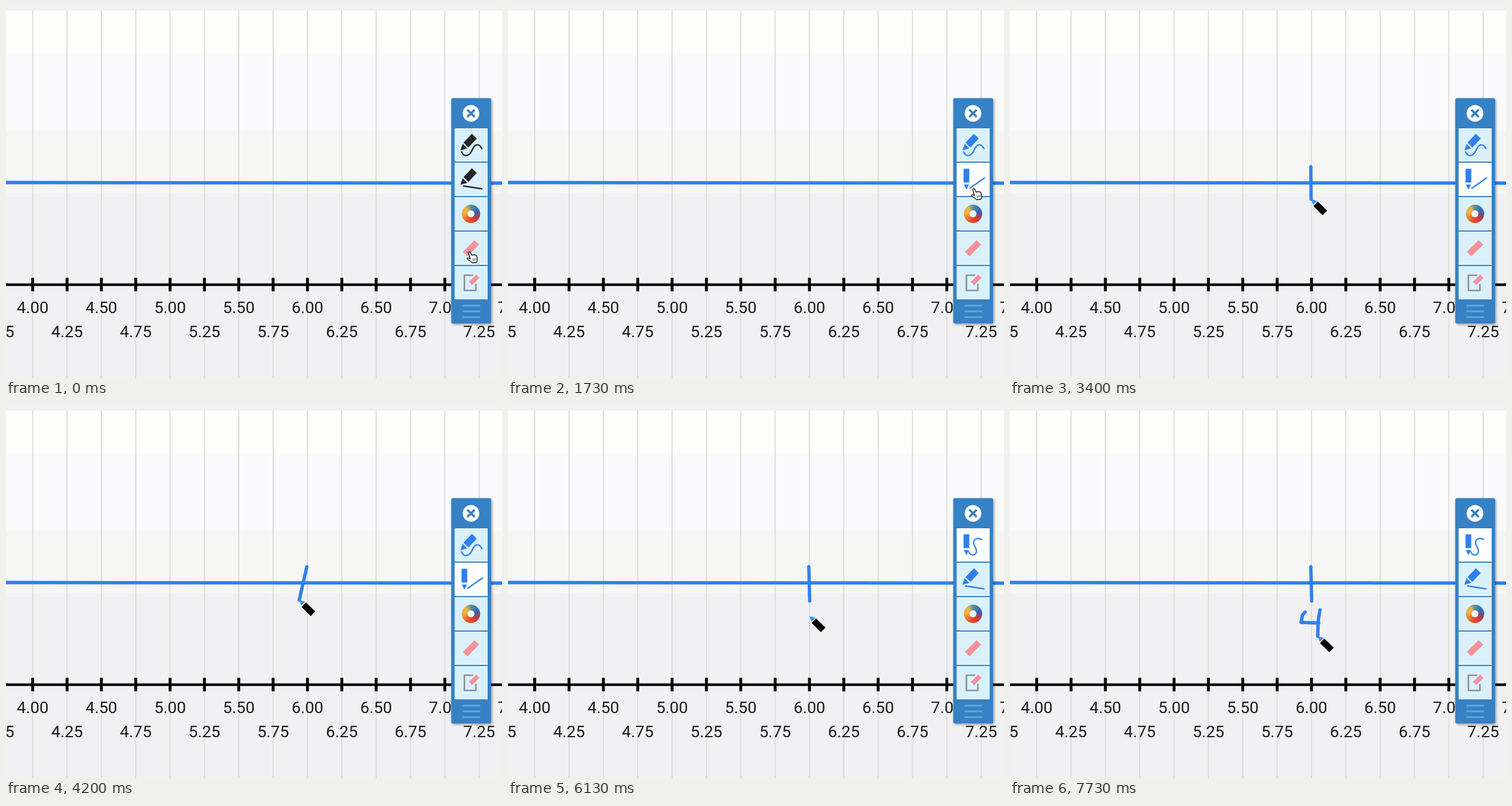
Recreate the animation shown at these times as an HTML page. Size 864 by 648 pixels, loop 9460 ms.

```html
<!DOCTYPE html>
<html lang="en">
<head>
<meta charset="utf-8">
<title>Number line drawing</title>
<style>
  html, body { margin: 0; width: 100%; height: 100%; overflow: hidden; background: #f1f1f3; }
  svg { display: block; width: 864px; height: 648px; }
  text { font: 28.4px Roboto, sans-serif; text-anchor: middle; fill: #1c1c1c; }
  .bar { fill: #3681c3; filter: drop-shadow(2px 2px 2px rgba(0, 0, 0, .35)); }
  .cell { fill: #daf1fc; }
  .ink, .icon path { fill: none; stroke-linecap: round; stroke-linejoin: round; }
  .ink { stroke: #2f80ed; stroke-width: 5.8; }
  .icon { fill: currentColor; stroke: none; }
  .icon path { stroke: currentColor; stroke-width: 2.4; }
  .wheel {
    width: 32px; height: 32px; border-radius: 50%;
    background:
      radial-gradient(circle, #eef6fa 5.5px, transparent 6.5px),
      conic-gradient(#5c8c98, #3c78b8 40deg, #3f5f9c 80deg, #a0405c 110deg, #dc3c2c 150deg,
        #e4502c 200deg, #f08a34 245deg, #f4b23e 285deg, #d8b450 325deg, #5c8c98);
  }
  .pink { fill: #f4929a; }
  [data-tool="line"] .line, [data-tool="free"] .free { fill: #fff; }
  .on { display: none; }
  [data-tool="line"] .line .on, [data-tool="free"] .free .on { display: inline; }
  [data-tool="line"] .line .off, [data-tool="free"] .free .off { display: none; }
  [data-tool="line"] .line.cell, [data-tool="free"] .free.cell { fill: #fff; }
</style>
</head>
<body>
<svg id="stage" viewBox="0 0 864 648">
  <defs>
    <g id="tilted">
      <polygon points="811.5,222.5 820,231 805.5,246.5 797,238"/>
      <polygon points="795.5,240 803.5,248 791.5,251.5"/>
    </g>
    <g id="upright">
      <rect x="793.5" y="223.5" width="10" height="24"/>
      <polygon points="794,251 803,251 798.5,260"/>
    </g>
  </defs>

  <rect width="864" height="648" fill="#f1f1f3"/>
  <rect y="8" width="864" height="75" fill="#fefefd"/>
  <rect y="83" width="864" height="135" fill="#fafafd"/>
  <rect y="218" width="864" height="108" fill="#f6f6f5"/>
  <path id="grid" stroke="#dcdcda" stroke-width="2"/>
  <path d="M0 485.5H864" stroke="#000" stroke-width="4.5"/>
  <path id="ticks" stroke="#000" stroke-width="5"/>
  <g id="labels"></g>

  <path class="ink" d="M-5 307.5L870 308.5"/>
  <path class="ink" id="rule"/>
  <path class="ink" id="script"/>

  <rect class="bar" x="775.5" y="160.500" width="69.500" height="392.500" rx="3"/>
  <circle cx="810" cy="187" r="14.500" fill="#fff"/>
  <path d="M804.800 181.800l10.400 10.400m0-10.400l-10.400 10.400" stroke="#3681c3" stroke-width="4" stroke-linecap="round"/>
  <g id="cells"></g>

  <g class="icon free">
    <g class="off">
      <use href="#tilted"/>
      <path d="M793.500 254C798 264 807 262 812 251C817 239 824 239 829 248.500"/>
    </g>
    <g class="on" fill="currentColor">
      <use href="#upright"/>
      <path d="M825 232.500C819 229 811 231 811 238C811 244 816 246 816 253C816 261 805 262 803 254"/>
    </g>
  </g>
  <g class="icon line" transform="translate(0 60)">
    <g class="off">
      <use href="#tilted"/>
      <path d="M797 253.500L829 258.500"/>
    </g>
    <g class="on" fill="currentColor">
      <use href="#upright"/>
      <path d="M804.500 257.500L830 239.500"/>
    </g>
  </g>
  <foreignObject x="794" y="346" width="32" height="32"><div class="wheel"></div></foreignObject>
  <rect class="pink" x="-14.500" y="-5.500" width="29" height="11" transform="translate(810 422) rotate(-45)"/>
  <path d="M814 469H798.500V495.500H818.500V484" fill="none" stroke="#8e8e8e" stroke-width="2.600"/>
  <rect class="pink" x="-9" y="-4" width="18" height="8" transform="translate(815.500 477) rotate(-45)"/>
  <path d="M795 522H826M795 532H826M795 542H826" stroke="#62a5dd" stroke-width="3"/>

  <g id="palette">
    <path class="cell" d="M782 332H434.500V391.500H782"/>
    <rect x="724" y="333" width="58" height="58" fill="#fff"/>
    <path d="M782 332H434.500V391.500H782" fill="none" stroke="#3681c3" stroke-width="2.200"/>
  </g>

  <g id="pencil">
    <polygon points="0,0 10.500,3 3.500,9.500" fill="#3b8cf0"/>
    <polygon points="11.500,4 28,20 20,28 4,12" fill="#000" stroke="#fff" stroke-opacity=".6" stroke-width="1" paint-order="stroke"/>
  </g>
  <g id="hand" fill="#fff" stroke="#111" stroke-width="1.400" stroke-linejoin="round">
    <path d="M-1.500 2Q-.5-1 2 1L4.500 6.500Q6 4.500 7.500 6Q9 4.500 10.500 6Q12.500 5.500 13 8L14 13Q14.500 16 12.500 18.500L5.500 19.500Q2 16-3.500 13Q-4 10.500-1 11L1.500 12Z"/>
    <path d="M6 12.500l1 3.500m1.500-4l1 3.500m1.500-4l1 3" stroke-width="1"/>
  </g>
</svg>
<script>
const LOOP = 9460, FPS = 15;
const BLUE = '#2f80ed', BLACK = '#252525';
const $ = id => document.getElementById(id);
const stage = $('stage');

function add(parent, tag, attrs, text = '') {
  const el = document.createElementNS('http://www.w3.org/2000/svg', tag);
  for (const k in attrs) el.setAttribute(k, attrs[k]);
  el.textContent = text;
  parent.append(el);
}

// Number line: one mark per quarter, labels on two alternating rows
let grid = '', ticks = '';
for (let i = -1; i < 15; i++) {
  const x = 46.5 + i * 59.83;
  grid += `M${x} 8V648`;
  ticks += `M${x} 473.5V497`;
  add($('labels'), 'text', { x, y: i % 2 ? 577 : 535 }, (4 + i / 4).toFixed(2));
}
$('grid').setAttribute('d', grid);
$('ticks').setAttribute('d', ticks);

['free', 'line', '', '', ''].forEach((tool, i) =>
  add($('cells'), 'rect', { class: 'cell ' + tool, x: 781.5, y: 213 + i * 60, width: 57.5, height: 58 }));

['#d8473f', '#f3a33a', '#fbe84a', '#4fae33', BLUE, BLACK].forEach((fill, i) =>
  add($('palette'), 'circle', { cx: 464.5 + i * 57.6, cy: 362, r: 15.7, fill }));

// Cursor path: step, x, y
const track = [
  [1, 807, 428], [4, 815, 368], [10, 815, 368], [17, 693, 363], [19, 694, 364],
  [25, 811, 318], [37, 811, 318], [43, 524, 281], [45, 524, 280], [51, 524.5, 336.5],
  [54, 524.5, 336.5], [57, 543, 337], [64, 509, 338], [65, 509, 338], [71, 525.5, 339.5],
  [75, 525.5, 339.5], [76, 563, 341], [81, 808, 246], [83, 808, 246], [90, 526, 366],
  [92, 525, 366], [95, 514, 359], [97, 509.5, 364], [99, 507, 377], [103, 538, 378],
  [105, 541, 358], [107, 540, 355], [110, 537, 373], [116, 536, 401]
];

function cursorAt(n) {
  const i = track.findIndex(k => k[0] > n);
  if (i === 0) return track[0].slice(1);
  if (i < 0) return track[track.length - 1].slice(1);
  const [a, ax, ay] = track[i - 1], [b, bx, by] = track[i];
  const u = (n - a) / (b - a), e = u * u * (3 - 2 * u);
  return [ax + (bx - ax) * e, ay + (by - ay) * e];
}

function stroke(from, to, n) {
  if (n < from) return '';
  const pts = [];
  for (let k = from; k <= Math.min(n, to); k++) pts.push(cursorAt(k).join(' '));
  return `M${pts[0]}L${pts.join('L')}`;
}

function draw(t) {
  const n = Math.floor((t + 7) * FPS / 1000);
  const [x, y] = cursorAt(n);
  const isHand = n < 26 || x > 775;
  stage.dataset.tool = n < 26 ? '' : n < 83 ? 'line' : 'free';
  stage.style.color = n < 20 ? BLACK : BLUE;
  $('palette').style.display = n >= 7 && n < 20 ? '' : 'none';
  $('hand').style.display = isHand ? '' : 'none';
  $('pencil').style.display = isHand ? 'none' : '';
  $(isHand ? 'hand' : 'pencil').setAttribute('transform', `translate(${x} ${y})`);
  $('rule').setAttribute('d', n < 45 ? '' : `M524 280L${cursorAt(Math.min(n, 71)).join(' ')}`);
  $('script').setAttribute('d', stroke(95, 103, n) + stroke(107, 116, n));
}

const start = performance.now();
function tick() {
  draw((performance.now() - start) % LOOP);
  requestAnimationFrame(tick);
}
tick();
</script>
</body>
</html>
```
